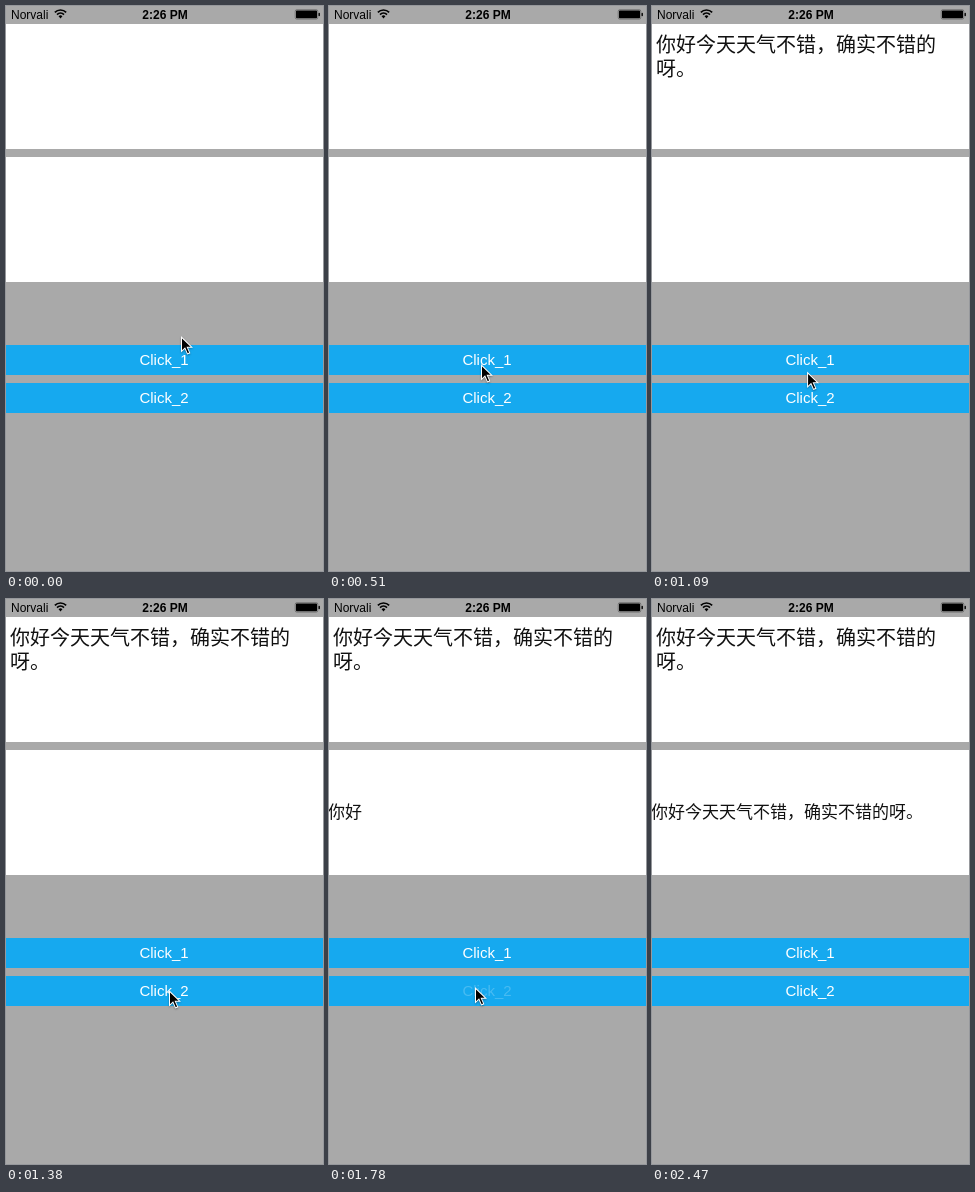
Recreate the animation shown at these times as an HTML page with a canvas. Size 317 by 565 pixels, loop 2.88 s.

```html
<!DOCTYPE html>
<html lang="zh">
<head>
<meta charset="utf-8">
<title>Typing labels</title>
<style>
  html, body { margin: 0; width: 100%; height: 100%; overflow: hidden; background: #a9a9a9; }
  canvas { display: block; width: 317px; height: 565px; }
</style>
</head>
<body>
<canvas id="stage" width="317" height="565"></canvas>
<script>
const ctx = document.getElementById('stage').getContext('2d');
const LOOP = 2880, STEP = 57.5;
const LATIN = '"Liberation Sans", Arial, sans-serif';
const HAN = '"Noto Sans CJK SC", "Noto Sans CJK", sans-serif';
const MESSAGE = '你好今天天气不错\uff0c确实不错的呀。';
const CHARS_PER_STEP = 2.58;

// Times below are counted in steps of the screen refresh.
const buttons = [
  { label: 'Click_1', y: 339, press: 12, release: 12.1, typing: 11.85 },
  { label: 'Click_2', y: 377, press: 30, release: 30.9, typing: 30.15 }
];
const path = [
  [0, 175, 330], [9, 152, 358], [14, 152, 358], [15, 153, 358], [18, 153, 359],
  [21, 161, 384], [24, 163, 391], [31, 146, 388], [36, 148, 387],
  [38, 149, 387], [41, 160, 386], [42, 212, 501]
];

const clamp = v => Math.min(1, Math.max(0, v));
const smooth = v => v * v * (3 - 2 * v);

function rect(x, y, w, h, color) {
  ctx.fillStyle = color;
  ctx.fillRect(x, y, w, h);
}

function text(str, x, y, font, color, align = 'left') {
  ctx.font = font;
  ctx.fillStyle = color;
  ctx.textAlign = align;
  ctx.fillText(str, x, y);
}

function drawStatusBar() {
  text('Norvali', 5, 12.5, '12px ' + LATIN, '#000');
  text('2:26 PM', 159, 12.5, 'bold 12px ' + LATIN, '#000', 'center');

  ctx.strokeStyle = '#000';
  ctx.lineWidth = 1.7;
  for (const r of [4.9, 8]) {
    ctx.beginPath();
    ctx.arc(54.5, 12, r, -Math.PI * 0.75, -Math.PI * 0.25);
    ctx.stroke();
  }
  ctx.fillStyle = '#000';
  ctx.beginPath();
  ctx.moveTo(54.5, 12.6);
  ctx.arc(54.5, 12.2, 2.7, -Math.PI * 0.75, -Math.PI * 0.25);
  ctx.fill();

  ctx.strokeStyle = 'rgba(0,0,0,0.5)';
  ctx.lineWidth = 0.6;
  ctx.beginPath();
  ctx.roundRect(289.2, 3.7, 22.6, 9.4, 1.6);
  ctx.stroke();
  ctx.beginPath();
  ctx.roundRect(290, 4.5, 21, 7.8, 0.8);
  ctx.roundRect(312.5, 6.8, 1.4, 3.4, 0.7);
  ctx.fill();
}

function drawButton(button, step) {
  rect(0, button.y, 317, 30, '#16a9ef');
  const alpha = step < button.press ? 1
    : 0.2 + 0.8 * clamp((step - button.release) / 5.1);
  text(button.label, 158, button.y + 20, '15px ' + LATIN,
    `rgba(255,255,255,${alpha})`, 'center');
}

function typed(button, step) {
  return MESSAGE.slice(0, Math.max(0, Math.floor((step - button.typing) * CHARS_PER_STEP)));
}

function drawMessage(str, x, y, size, perLine, leading) {
  for (let i = 0; i < str.length; i += perLine) {
    text(str.slice(i, i + perLine), x, y + i / perLine * leading, `300 ${size}px ${HAN}`, '#111');
  }
}

function drawCursor(step) {
  const next = path.findIndex(key => key[0] > step);
  const [t0, x0, y0] = next < 0 ? path[path.length - 1] : path[next - 1];
  const [t1, x1, y1] = next < 0 ? [t0 + 1, x0, y0] : path[next];
  const p = smooth((step - t0) / (t1 - t0));

  ctx.save();
  ctx.translate(x0 + (x1 - x0) * p, y0 + (y1 - y0) * p);
  ctx.shadowColor = 'rgba(0,0,0,0.35)';
  ctx.shadowBlur = 2;
  ctx.shadowOffsetY = 1;
  ctx.fillStyle = '#fff';
  ctx.fill(new Path2D('M0 0V16.6L3.8 13L6.2 18.6L9.4 17.2L7 11.8H12Z'));
  ctx.shadowColor = 'transparent';
  ctx.fillStyle = '#000';
  ctx.fill(new Path2D('M1 2.4V14.2L4.1 11.3L6.7 17.2L8.1 16.6L5.5 10.8H9.6Z'));
  ctx.restore();
}

function draw(time) {
  const step = Math.floor((time % LOOP + 10) / STEP);
  rect(0, 0, 317, 565, '#a9a9a9');
  rect(0, 18, 317, 125, '#fff');
  rect(0, 151, 317, 125, '#fff');
  drawStatusBar();
  buttons.forEach(button => drawButton(button, step));
  drawMessage(typed(buttons[0], step), 4, 46, 20, 14, 24);
  drawMessage(typed(buttons[1], step), -1, 219, 17, MESSAGE.length, 0);
  if (step < 43) drawCursor(step);
}

const start = performance.now();
function tick() {
  draw(performance.now() - start);
  requestAnimationFrame(tick);
}
tick();
</script>
</body>
</html>
```
